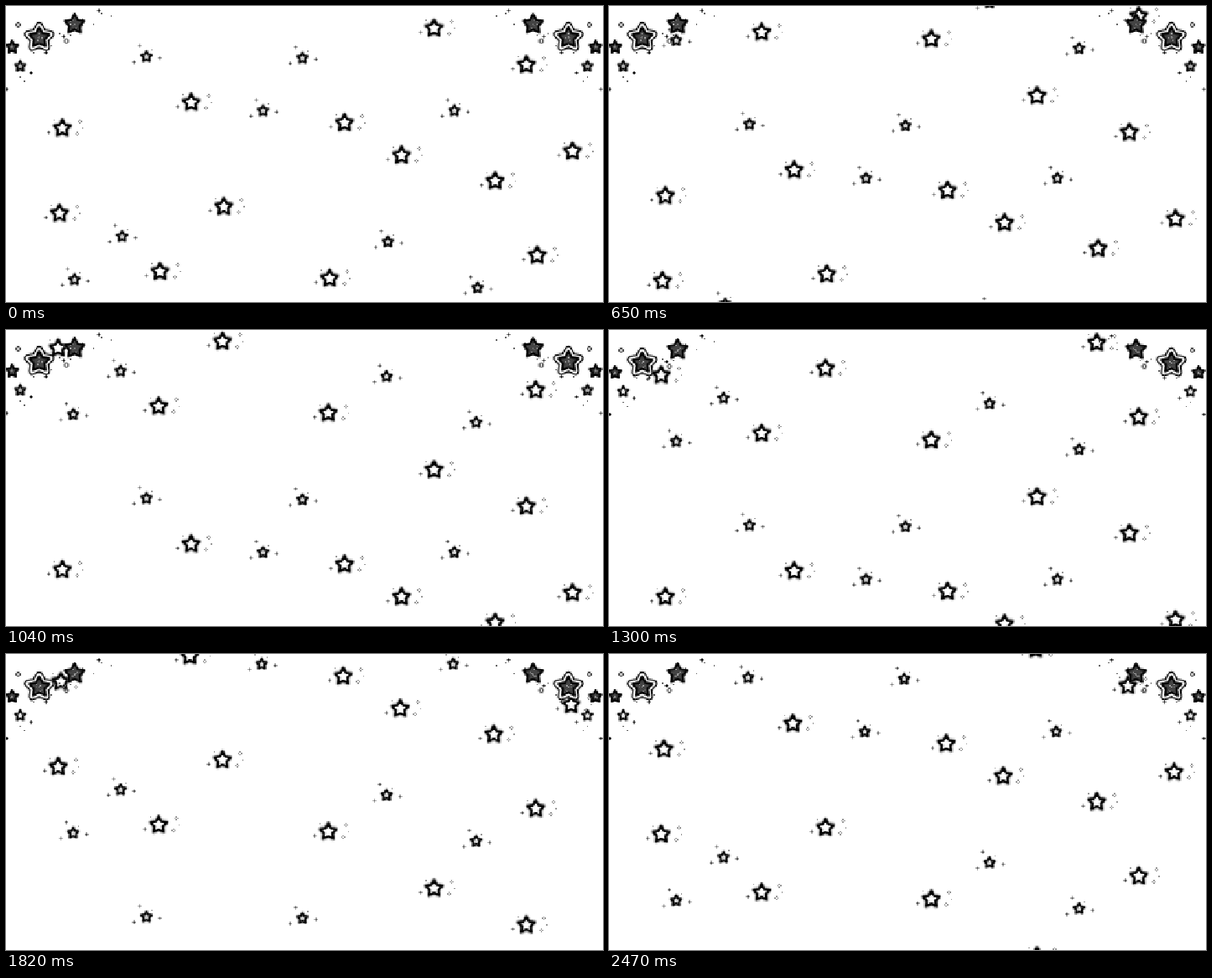
Animation of 712x354 px, one loop 2.6 s. Source, as an HTML page with a canvas:

```html
<!DOCTYPE html>
<html lang="en">
<head>
<meta charset="utf-8">
<title>Falling stars</title>
<style>
  html, body { margin: 0; width: 100%; height: 100%; overflow: hidden; background: #fff; }
  canvas { display: block; width: 712px; height: 354px; image-rendering: pixelated; }
</style>
</head>
<body>
<canvas id="sky" width="440" height="219"></canvas>
<script>
const ctx = document.getElementById('sky').getContext('2d');
const STEP = 130;
const STEPS = 20;
const TILE = 227;

// Layout of the falling stars in one tile
const bigStars = [
  [315, 16], [383, 43], [136, 71], [249, 86], [41, 90], [291, 110], [417, 107],
  [360, 129], [39, 153], [160, 148], [113, 196], [238, 201], [391, 184]
];
const smallStars = [
  [103, 37], [218, 38], [189, 77], [330, 77], [85, 170], [281, 174], [50, 202], [347, 208]
];

function seeded(seed) {
  return () => (seed = (seed * 1103 + 4721) % 9973) / 9973;
}

function dot(x, y, color = '#999') {
  ctx.fillStyle = color;
  ctx.fillRect(x, y, 1, 1);
}

function diamond(x, y, color = '#999') {
  for (const d of [-1, 1]) {
    dot(x + d, y, color);
    dot(x, y + d, color);
  }
}

function plus(x, y, color = '#aaa', center = '#555') {
  diamond(x, y, color);
  dot(x, y, center);
}

function ring(x, y) {
  ctx.strokeStyle = '#333';
  ctx.lineWidth = 1;
  ctx.beginPath();
  ctx.arc(x, y, 1.5, 0, Math.PI * 2);
  ctx.stroke();
}

function starPath(x, y, r) {
  ctx.beginPath();
  for (let i = 0; i < 10; i++) {
    const a = (i / 5 - 0.5) * Math.PI;
    const d = i % 2 ? r * 0.53 : r;
    ctx.lineTo(x + d * Math.cos(a), y + d * Math.sin(a));
  }
  ctx.closePath();
}

function stroke(color, width) {
  ctx.strokeStyle = color;
  ctx.lineWidth = width;
  ctx.stroke();
}

function star(x, y, r, { fill, line, halo, haloColor = '#bbb' }) {
  starPath(x + .5, y + .5, r);
  stroke(haloColor, halo);
  ctx.fillStyle = fill;
  ctx.fill();
  stroke('#000', line);
}

function bigStar(x, y) {
  star(x, y, 6.2, { fill: '#fff', line: 1.8, halo: 3.6 });
  plus(x - 10, y + 3);
  diamond(x + 13, y - 5);
  diamond(x + 11, y + 4);
  dot(x + 15, y);
  dot(x - 6, y - 6);
}

function smallStar(x, y) {
  star(x, y, 3.9, { fill: '#ddd', line: 1.5, halo: 2.8 });
  plus(x - 5, y - 8);
  plus(x - 9, y + 4);
  plus(x + 10, y + 1);
  dot(x + 4, y - 5);
}

// Dark star sprinkled with grey specks that change with the phase
function glitterStar(x, y, r, phase) {
  star(x, y, r, { fill: '#444', line: 1.6, halo: 1.6 });
  const rand = seeded(17 + r * 31 + phase * 57);
  for (let i = 0; i < r; i++) {
    const a = rand() * Math.PI * 2, d = rand() * r * 0.45;
    const shade = 90 + Math.floor(rand() * 90);
    dot(Math.round(x + d * Math.cos(a)), Math.round(y + d * Math.sin(a)),
      `rgb(${shade},${shade},${shade})`);
  }
}

// Crosses and dots strewn along a curve around the corner
function dust() {
  const rand = seeded(23);
  for (let i = 0; i < 18; i++) {
    const t = i / 17;
    const x = Math.round(72 * t + rand() * 6);
    const y = Math.round(56 * (1 - t) ** 2 + rand() * 12);
    if (i % 3) dot(x, y, '#666');
    else plus(x, y, '#777', '#000');
  }
}

function corner(phase) {
  dust();
  ring(9, 14);
  ring(44.5, 26);
  star(24, 23, 8.5, { fill: '#fff', line: 3.6, halo: 6, haloColor: '#000' });
  starPath(24.5, 23.5, 8.5);
  stroke('#fff', 3.8);
  glitterStar(24, 23, 7.8, phase);
  glitterStar(50, 13, 7.6, phase);
  glitterStar(4, 30, 4.6, phase);
  star(10, 44, 3.9, { fill: phase ? '#eee' : '#aaa', line: 1.4, halo: 2.6 });
}

function corners(phase) {
  ctx.save();
  ctx.translate(0, phase);
  corner(phase);
  ctx.translate(439, 0);
  ctx.scale(-1, 1);
  corner(phase);
  ctx.restore();
}

// Steady fall with three uneven steps
const fallAt = i => 10 * i + (i > 5 ? 1 : 0) + (i > 7 ? 6 : 0) + (i > 13 ? 10 : 0);

function draw(i) {
  ctx.fillStyle = '#fff';
  ctx.fillRect(0, 0, 440, 219);
  const fall = fallAt(i);
  for (const [dx, dy] of [[0, fall], [-1, fall - TILE]]) {
    for (const [x, y] of bigStars) bigStar(x + dx, y + dy);
    for (const [x, y] of smallStars) smallStar(x + dx, y + dy);
  }
  corners(i % 4 < 2 ? 0 : 1);
}

let shown = -1;
function tick() {
  const i = Math.floor(performance.now() / STEP) % STEPS;
  if (i !== shown) draw(shown = i);
  requestAnimationFrame(tick);
}
ctx.lineJoin = 'round';
tick();
</script>
</body>
</html>
```
